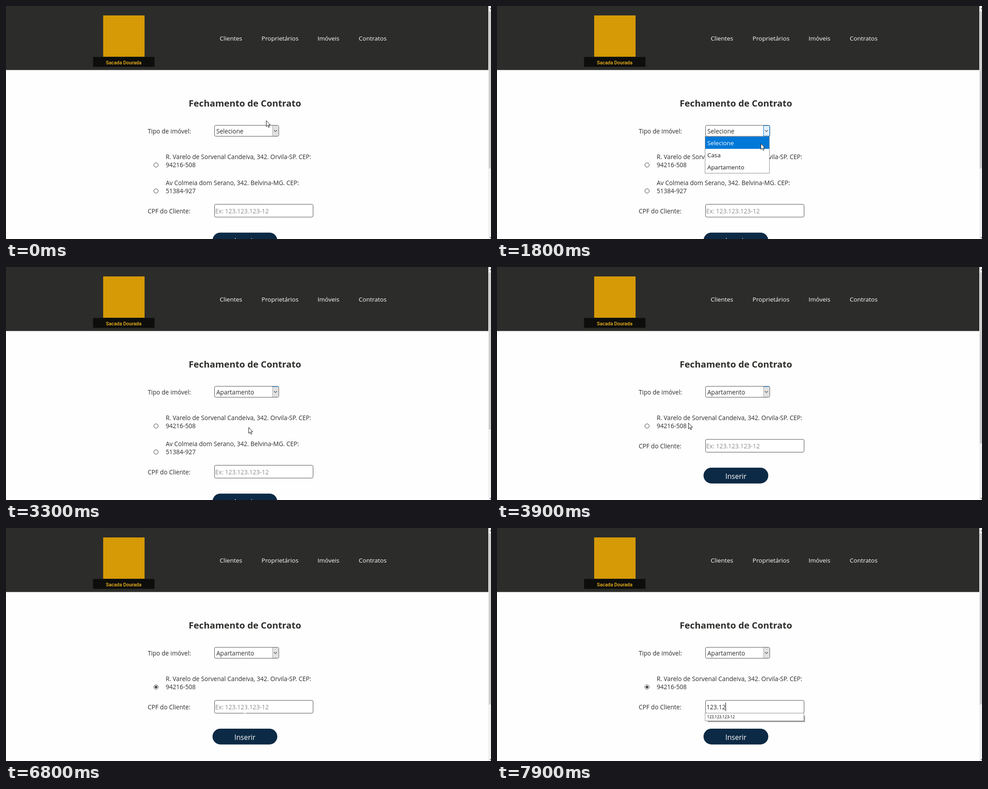
These frames come from a looping animation (1078x519 px, 8 s). An HTML page:

```html
<!DOCTYPE html>
<html lang="pt-BR">
<head>
<meta charset="utf-8">
<title>Fechamento de Contrato</title>
<style>
  html, body { margin: 0; width: 100%; height: 100%; overflow: hidden; background: #fefefe; }
  svg { display: block; width: 1078px; height: 519px; }
  text { font: 13.6px "Open Sans", "Noto Sans", sans-serif; fill: #2c2c2a; white-space: pre; }
  .nav text { fill: #fff; font-size: 13.5px; }
  .title { font-size: 20.2px; font-weight: 700; text-anchor: middle; }
  .brand { font: 500 10.8px Roboto, sans-serif; fill: #f5b81c; text-anchor: middle; }
  .button { font-size: 15.6px; fill: #fff; text-anchor: middle; }
  .hint { fill: #8b8b8b; }
  .options text { font-size: 13.3px; fill: #1a1a1a; }
  .matches text { font-size: 8.6px; fill: #000; }
  .field { fill: #fff; stroke: #4d4d4d; }
  .chevron { fill: none; stroke: #444; stroke-width: 1.1; }
</style>
</head>
<body>
<svg viewBox="0 0 1078 519">
  <rect width="1078" height="519" fill="#fefefe"/>
  <rect width="1072" height="142.6" fill="#2c2c2a"/>
  <rect x="216" y="21" width="92" height="92" fill="#d59a06"/>
  <rect x="193.5" y="113.5" width="136.5" height="22" fill="#0d0d0c"/>
  <text class="brand" x="261.5" y="130">Sacada Dourada</text>
  <g class="nav">
    <text x="475" y="77">Clientes</text>
    <text x="568" y="77">Proprietários</text>
    <text x="692.5" y="77">Imóveis</text>
    <text x="784" y="77">Contratos</text>
  </g>

  <rect x="1072" width="6" height="519" fill="#f0f0f0"/>
  <rect id="thumb" x="1073" y="12" width="5" fill="#cdcdcd"/>
  <path d="M1075.5 7.5L1078 5M1075.5 514.5L1078 517" class="chevron"/>

  <text class="title" x="531" y="224">Fechamento de Contrato</text>
  <text x="315" y="284">Tipo de imóvel:</text>
  <rect class="field" x="463.5" y="265.8" width="143" height="24.4" rx="3"/>
  <text id="kind" x="467.5" y="284"></text>
  <rect id="arrowBox" x="592.5" y="266.5" width="13.5" height="23"/>
  <path id="focusLine" d="M592 266.4H606" stroke="#0078d7"/>
  <path class="chevron" d="M595.5 276.5L598.8 279.8L602.1 276.5"/>

  <text x="355" y="341">R. Varelo de Sorvenal Candeiva, 342. Orvila-SP. CEP:</text>
  <text x="355" y="359.3">94216-508</text>
  <circle id="radio" cx="333.5" cy="354.2" r="4.8"/>
  <circle id="dot" cx="333.5" cy="354.2" r="2.7"/>

  <g id="secondHome">
    <text x="355" y="398.7">Av Colmeia dom Serano, 342. Belvina-MG. CEP:</text>
    <text x="355" y="417">51384-927</text>
    <circle cx="333.5" cy="412" r="4.8" fill="#fff" stroke="#333"/>
  </g>

  <g id="lower">
    <text x="315" y="404">CPF do Cliente:</text>
    <rect class="field" x="463.5" y="384" width="219" height="28.5" rx="3"/>
    <text id="hint" class="hint" x="465" y="404">Ex: 123.123.123-12</text>
    <text id="typed" x="465.5" y="404"></text>
    <rect id="caret" y="389" width="1" height="19" fill="#000"/>
    <rect x="459" y="447" width="144" height="35.2" rx="17.6" fill="#0c2a45"/>
    <text class="button" x="531" y="471.6">Inserir</text>
  </g>

  <g id="options" class="options">
    <rect x="462.5" y="290.5" width="143" height="82" fill="#fff" stroke="#8f8f8f"/>
  </g>
  <g id="matches" class="matches">
    <rect id="shadow" x="468" y="418" width="216.6" fill="#999"/>
    <rect id="sheet" x="462.5" y="412.3" width="219.5" fill="#fff" stroke="#999"/>
    <g id="listBar">
      <rect x="668.5" y="413" width="13" height="96" fill="#f0f0f0"/>
      <rect x="669" y="427" width="11.5" height="56" fill="#cdcdcd"/>
      <path class="chevron" stroke-width="1.5" d="M672 421L674.8 418.2L677.6 421M672 500.5L674.8 503.3L677.6 500.5"/>
    </g>
  </g>

  <path id="arrow" d="M.5.5V13.6L3.5 10.8L5.6 15.6L7.6 14.7L5.5 10H9.6Z" fill="#fff" stroke="#000" stroke-width=".9"/>
  <path id="beam" d="M-3 -8H3M0 -8V8M-3 8H3" stroke="#fff" stroke-width="1.2"/>
</svg>
<script>
const LOOP = 8000, TICK = 100;
const $ = id => document.getElementById(id);
const show = (id, on) => { $(id).style.display = on ? '' : 'none'; };
const set = (el, attrs) => { for (const k in attrs) el.setAttribute(k, attrs[k]); };
const add = (parent, tag, attrs) => {
  const el = document.createElementNS('http://www.w3.org/2000/svg', tag);
  set(el, attrs);
  return parent.appendChild(el);
};

// [start in ms, x, y] of the pointer tip
const pointer = [
  [0, 578, 255], [100, 598, 266], [300, 600, 269], [400, 601, 271], [500, 602, 273],
  [1700, 598, 286], [1800, 586, 306], [1900, 572, 325], [2000, 563, 334],
  [2300, 555, 342], [2400, 546, 350], [2500, 539, 357], [3900, 425, 347],
  [4100, 408, 352], [4200, 380, 357], [4300, 350, 359], [4400, 325, 359],
  [4500, 314, 358], [4600, 322, 355], [4700, 331, 353],
  [5500, 346, 352], [5600, 385, 362], [5700, 440, 378], [5800, 497, 396], [5900, 531, 404]
];
const typing = [[0, ''], [7100, '1'], [7300, '12'], [7500, '123'], [7700, '123.'], [7800, '123.1'], [7900, '123.12']];
const saved = ['123', '111.111.111-11', '123.456.731-11', '123.123.123-12', '11734566789', '1234', '12345678'];
const kinds = ['Selecione', 'Casa', 'Apartamento'];
const VISIBLE = 6;

const at = (steps, t) => steps.filter(s => s[0] <= t).pop();

const rows = kinds.map((name, i) => {
  const y = 291 + i * 27.2;
  const bar = add($('options'), 'rect', { x: 463, y, width: 142, height: 27.2, fill: '#0078d7' });
  const label = add($('options'), 'text', { x: 467.5, y: y + 18.5 });
  label.textContent = name;
  return { bar, label };
});
const lines = Array.from({ length: VISIBLE }, (_, i) =>
  add($('matches'), 'text', { x: 467, y: 424.2 + i * 16 }));

function drawSelect(t) {
  const open = t >= 1000 && t < 3300;
  const chosen = t < 1900 ? 0 : t < 2400 ? 1 : 2;
  show('options', open);
  rows.forEach(({ bar, label }, i) => {
    bar.style.display = i === chosen ? '' : 'none';
    label.style.fill = i === chosen ? '#fff' : '';
  });
  $('kind').textContent = kinds[t < 3300 ? 0 : 2];
  set($('arrowBox'), open ? { fill: '#e5f1fb', stroke: '#0078d7' } : { fill: '#e1e1e1', stroke: '#adadad' });
  show('focusLine', t >= 3300 && t < 5100);
}

function drawRadio(t) {
  const pressed = t >= 5100 && t < 5300;
  const color = pressed ? '#666' : t >= 4600 && t < 5600 ? '#0078d7' : '#333';
  set($('radio'), { fill: pressed ? '#ccc' : '#fff', stroke: color });
  set($('dot'), { fill: color });
  show('dot', t >= 5300);
}

function drawLayout(t) {
  const filtered = t >= 3400;
  show('secondHome', !filtered);
  set($('lower'), { transform: `translate(0 ${filtered ? 0 : 57.7})` });
  set($('thumb'), { height: filtered ? 381 : 350 });
}

function drawInput(t) {
  const value = at(typing, t)[1];
  const found = value ? saved.filter(s => s.startsWith(value)) : [];
  const count = Math.min(found.length, VISIBLE);
  const height = 1.2 + count * 16;
  show('hint', !value);
  $('typed').textContent = value;
  show('caret', (t >= 6300 && t < 6800) || t >= 7100);
  set($('caret'), { x: value ? 465.3 + $('typed').getComputedTextLength() : 465 });
  show('matches', count > 0);
  show('listBar', found.length > VISIBLE);
  set($('sheet'), { height });
  set($('shadow'), { height: Math.max(0, height - 3) });
  lines.forEach((line, i) => { line.textContent = found[i] || ''; });
}

function drawPointer(t) {
  const [, x, y] = at(pointer, t);
  const overInput = t >= 5800;
  show('arrow', !overInput);
  show('beam', overInput && t < 7500);
  set($(overInput ? 'beam' : 'arrow'), { transform: `translate(${x} ${y})` });
}

function draw(ms) {
  const t = Math.floor(ms % LOOP / TICK) * TICK;
  [drawSelect, drawRadio, drawLayout, drawInput, drawPointer].forEach(part => part(t));
}

const start = performance.now();
function frame() {
  draw(performance.now() - start);
  requestAnimationFrame(frame);
}
frame();
</script>
</body>
</html>
```
